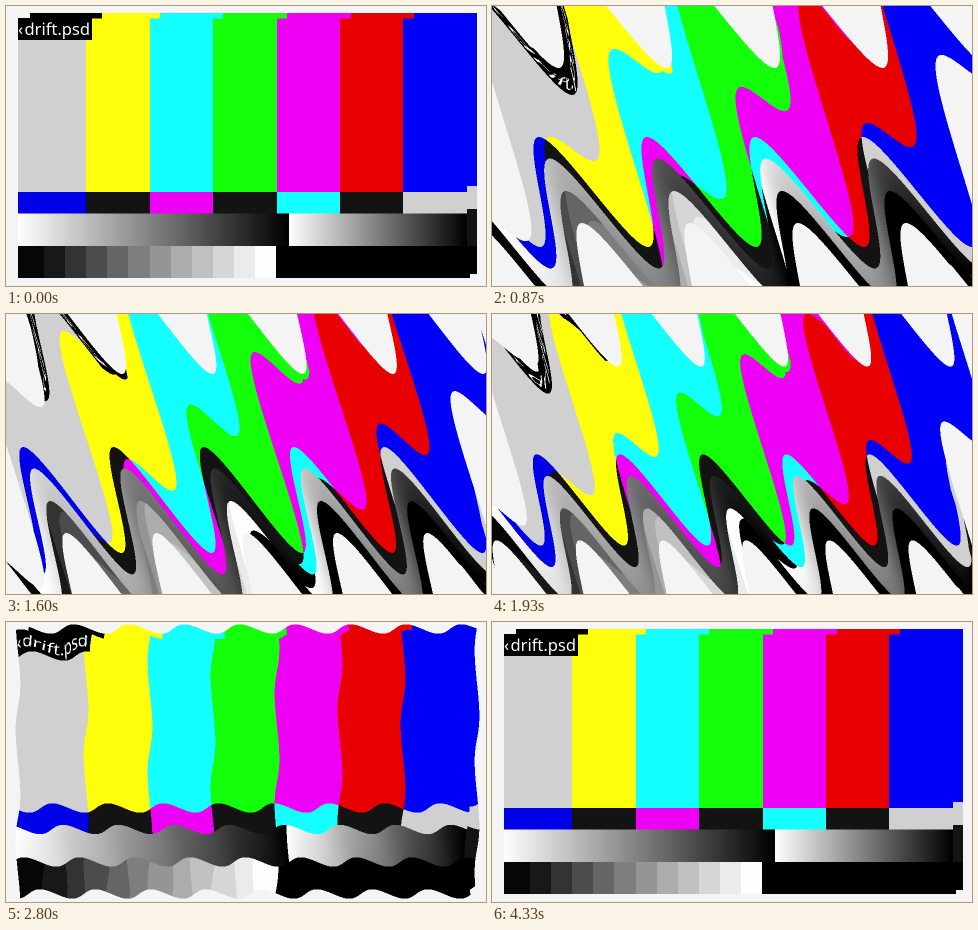
Write an HTML page with a canvas that moves like this. It is 480x280 px and loops after 4.39 s.

```html
<!DOCTYPE html>
<html lang="en">
<head>
<meta charset="utf-8">
<title>Rippling test card</title>
<style>
  html, body { margin: 0; width: 100%; height: 100%; overflow: hidden; background: #f4f4f4; }
  canvas { display: block; width: 480px; height: 280px; }
</style>
</head>
<body>
<canvas id="stage" width="480" height="280"></canvas>
<script>
const W = 480, H = 280, LOOP = 4390, FPS = 15, SCALE = 2;
const ctx = document.getElementById('stage').getContext('2d');
const PAPER = '#f4f4f4', GREY = '#d0d0d0', INK = '#131313';

function drawCard() {
  const c = document.createElement('canvas');
  c.width = W * SCALE;
  c.height = H * SCALE;
  const g = c.getContext('2d');
  g.scale(SCALE, SCALE);

  const box = (fill, x0, y0, x1, y1) => {
    g.fillStyle = fill;
    g.fillRect(x0, y0, x1 - x0, y1 - y0);
  };
  const row = (edges, fills, y0, y1) =>
    fills.forEach((fill, i) => box(fill, edges[i], y0, edges[i + 1], y1));
  const ramp = (x0, x1, y0, y1) => {
    const fade = g.createLinearGradient(x0, 0, x1, 0);
    fade.addColorStop(0, '#fff');
    fade.addColorStop(1, '#000');
    box(fade, x0, y0, x1, y1);
  };

  box(PAPER, 0, 0, W, H);

  const edges = [12, 80, 144, 207, 271, 334, 397, 471];
  const bars = [GREY, '#ffff0c', '#14ffff', '#14ff0a', '#ee00f4', '#e80000', '#0000f8'];
  row(edges, bars, 12, 186);
  row([24, 96, 154, 217, 281, 345, 408, 471], ['#000', ...bars.slice(1)], 7, 12.5);

  row(edges, ['#0000e8', INK, '#ee00f4', INK, '#14ffff', INK, GREY], 186, 207.5);
  box(GREY, 461, 180, 471, 203);

  box('#000', 270, 207.5, 471, 268);
  box('#000', 270, 268, 464, 272);
  box(INK, 461, 203, 471, 240);
  ramp(12, 283, 207.5, 240);
  ramp(283, 461, 207.5, 240);

  box('#060606', 12, 240, 38, 272);
  for (let i = 0; i < 11; i++) {
    const v = Math.round(24 + 27 * i - 0.4 * i * i);
    const x = 38 + i * 21.1;
    box(`rgb(${v},${v},${v})`, Math.round(x), 240, Math.round(x + 21.1), 272);
  }

  box('#000', 12, 12, 86, 34);
  g.fillStyle = '#fff';
  g.font = '16.5px "Noto Sans", "Open Sans", sans-serif';
  g.fillText('drift.psd', 18.5, 29);
  g.fillText('‹', 12, 29);

  return new Uint32Array(g.getImageData(0, 0, c.width, c.height).data.buffer);
}

const card = drawCard();
const frame = ctx.createImageData(W, H);
const out = new Uint32Array(frame.data.buffer);
const clamp = (v, lo, hi) => Math.min(hi, Math.max(lo, v));

// Vertical reach of the wave: quick rise, plateau, then a soft decay.
function reach(t) {
  const u = clamp((t - 0.2) / 0.3, 0, 1);
  const rise = u * u * (3 - 2 * u);
  const fall = 1 / (1 + Math.exp((Math.min(t, 2.4) - 2.25) / 0.2));
  return 55 * rise * fall * Math.exp(-3.3 * Math.max(0, t - 2.4));
}

// Keys: seconds, wavelength, anchor of the phase.
const KEYS = [
  [0, 132, -62],
  [0.533, 117.3, -61.8],
  [1.2, 98.7, -54.4],
  [1.933, 83.2, -61.5],
  [2.4, 66.8, -61],
  [3.2, 44, -61],
  [4.4, 44, -61]
];

function waveAt(t) {
  const i = KEYS.findIndex(k => k[0] > t);
  const a = KEYS[i - 1], b = KEYS[i];
  const u = (t - a[0]) / (b[0] - a[0]);
  const mix = n => a[n] + (b[n] - a[n]) * u;
  return { len: mix(1), anchor: mix(2) };
}

// A slanted shear wave: points slide along (1, 2), the phase runs across it.
function render(t) {
  const amp = reach(t), { len, anchor } = waveAt(t);
  const cw = W * SCALE, ch = H * SCALE;
  const paper = card[0];
  const subs = [0.25, 0.75];

  // The slide depends only on x - y / 2, so one table at 1/8 px serves all.
  const base = H / 2 + 2, fine = 8;
  const slide = new Float32Array((W + base + 4) * fine);
  for (let i = 0; i < slide.length; i++) {
    const s = i / fine - base;
    slide[i] = amp * Math.cos(2 * Math.PI * ((s - anchor) / len - t));
  }

  for (let y = 0; y < H; y++) {
    for (let x = 0; x < W; x++) {
      let r = 0, g = 0, b = 0;
      for (const oy of subs) {
        for (const ox of subs) {
          const px = x + ox, py = y + oy;
          const d = slide[Math.round((px - py / 2 + base) * fine)];
          const sx = Math.floor((px - d / 2) * SCALE);
          const sy = Math.floor((py - d) * SCALE);
          const inside = sx >= 0 && sy >= 0 && sx < cw && sy < ch;
          const p = inside ? card[sy * cw + sx] : paper;
          r += p & 255;
          g += (p >> 8) & 255;
          b += (p >> 16) & 255;
        }
      }
      out[y * W + x] = (255 << 24) | ((b >> 2) << 16) | ((g >> 2) << 8) | (r >> 2);
    }
  }
  ctx.putImageData(frame, 0, 0);
}

let shown = -1;
const start = performance.now();
function tick() {
  const ms = (performance.now() - start) % LOOP;
  const step = Math.floor((ms + 4) * FPS / 1000);
  if (step !== shown) {
    shown = step;
    render(step / FPS);
  }
  requestAnimationFrame(tick);
}
tick();
</script>
</body>
</html>
```
